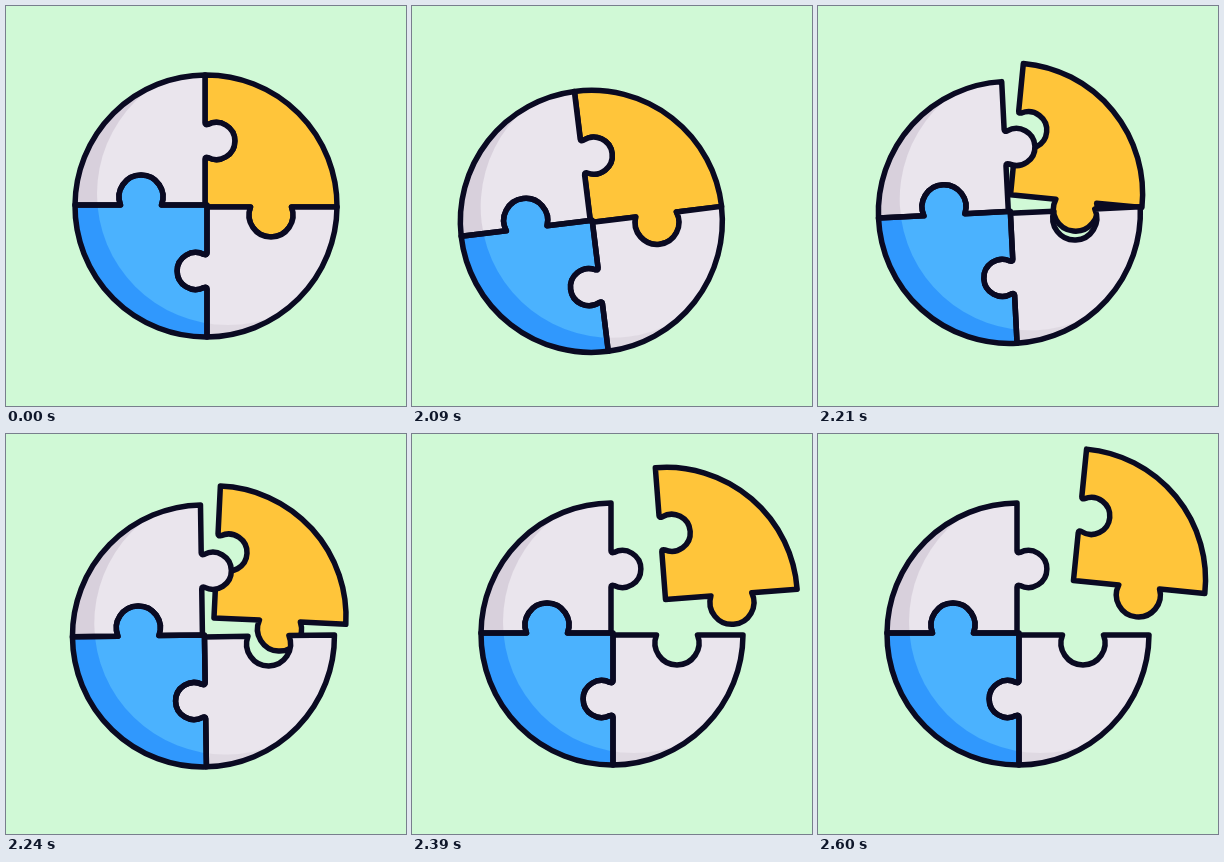
Recreate the animation shown at these times as an HTML page. Size 400 px wide and 400 px high, loop 2660 ms.

```html
<!DOCTYPE html>
<html lang="en">
<head>
<meta charset="utf-8">
<title>Puzzle circle</title>
<style>
  html, body { margin: 0; width: 100%; height: 100%; overflow: hidden; background: #d0f9d6; }
  svg { display: block; width: 100%; height: 100%; }
  .line { fill: none; stroke: #0a0a22; stroke-width: 5.5; stroke-linejoin: round; stroke-linecap: round; }
</style>
</head>
<body>
<svg viewBox="0 0 400 400">
  <defs>
    <!-- each outline serves two opposite quarters -->
    <path id="pale" d="M199 69V117q0 2.5 3 1.5A18.5 18.5 0 1 1 202 151.5q-3 -1 -3 1.5V199H155.5A22 22 0 1 0 114.5 199H69A131 131 0 0 1 199 69Z"/>
    <path id="vivid" d="M69 199H114.5A22 22 0 1 1 155.5 199H201V247q0 2.5 -3 1.5A18.5 18.5 0 1 0 198 281.5q3 -1 3 1.5V331A131 131 0 0 1 69 199Z"/>
    <clipPath id="inPale">
      <use href="#pale"/>
      <use href="#pale" transform="rotate(180 200 200)"/>
    </clipPath>
    <clipPath id="inBlue"><use href="#vivid"/></clipPath>
  </defs>

  <g id="loose">
    <g transform="rotate(180 200 200)">
      <use href="#vivid" fill="#ffc53a"/>
      <use href="#vivid" class="line"/>
    </g>
  </g>

  <g id="disc">
    <use href="#pale" fill="#d8d0dc"/>
    <use href="#pale" fill="#dfd9e2" transform="rotate(180 200 200)"/>
    <use href="#vivid" fill="#3098fd"/>
    <g clip-path="url(#inPale)"><circle cx="222" cy="188" r="131" fill="#eae5ed"/></g>
    <g clip-path="url(#inBlue)"><circle cx="222" cy="188" r="131" fill="#4bb2fe"/></g>
    <g class="line">
      <use href="#pale"/>
      <use href="#pale" transform="rotate(180 200 200)"/>
      <use href="#vivid"/>
    </g>
  </g>
</svg>
<script>
  const LOOP = 2660, REST = 2000, START = 2030, STEP = 30, LAST = 2600;
  const PEAK = 2120;   // the disc leans furthest and the loose quarter lets go
  const TILT = -8.3;

  const disc = document.getElementById('disc');
  const loose = document.getElementById('loose');

  function ease(t, from, to) {
    const u = Math.min(1, Math.max(0, (t - from) / (to - from)));
    return u * u * (3 - 2 * u);
  }

  // Critically damped spring from 0 to 1.
  function spring(t, rate) {
    const s = rate * Math.max(0, t - PEAK);
    return 1 - (1 + s) * Math.exp(-s);
  }

  // Moves and turns a part about its pivot.
  function place(part, px, py, dx, dy, angle) {
    part.setAttribute('transform', `translate(${dx} ${dy}) rotate(${angle} ${px} ${py})`);
  }

  function pose(t) {
    const lean = ease(t, REST, PEAK);
    const swing = lean - ease(t, PEAK, 2270);
    place(disc, 200, 200, -24.5 * swing, 18.2 * swing, TILT * swing);

    const wobble = ease(t, 2130, 2215) - ease(t, 2215, 2300) + ease(t, 2300, 2560);
    place(loose, 254, 146,
      -32.6 * lean + 95.6 * spring(t, 0.013),
      10.9 * lean - 61.1 * spring(t, 0.0118),
      TILT * lean + 14 * wobble);
  }

  const began = performance.now();

  function draw() {
    const now = (performance.now() - began) % LOOP;
    const held = START + STEP * Math.floor((now - START) / STEP);
    pose(now < START ? REST : Math.min(LAST, held));
    requestAnimationFrame(draw);
  }
  draw();
</script>
</body>
</html>
```
